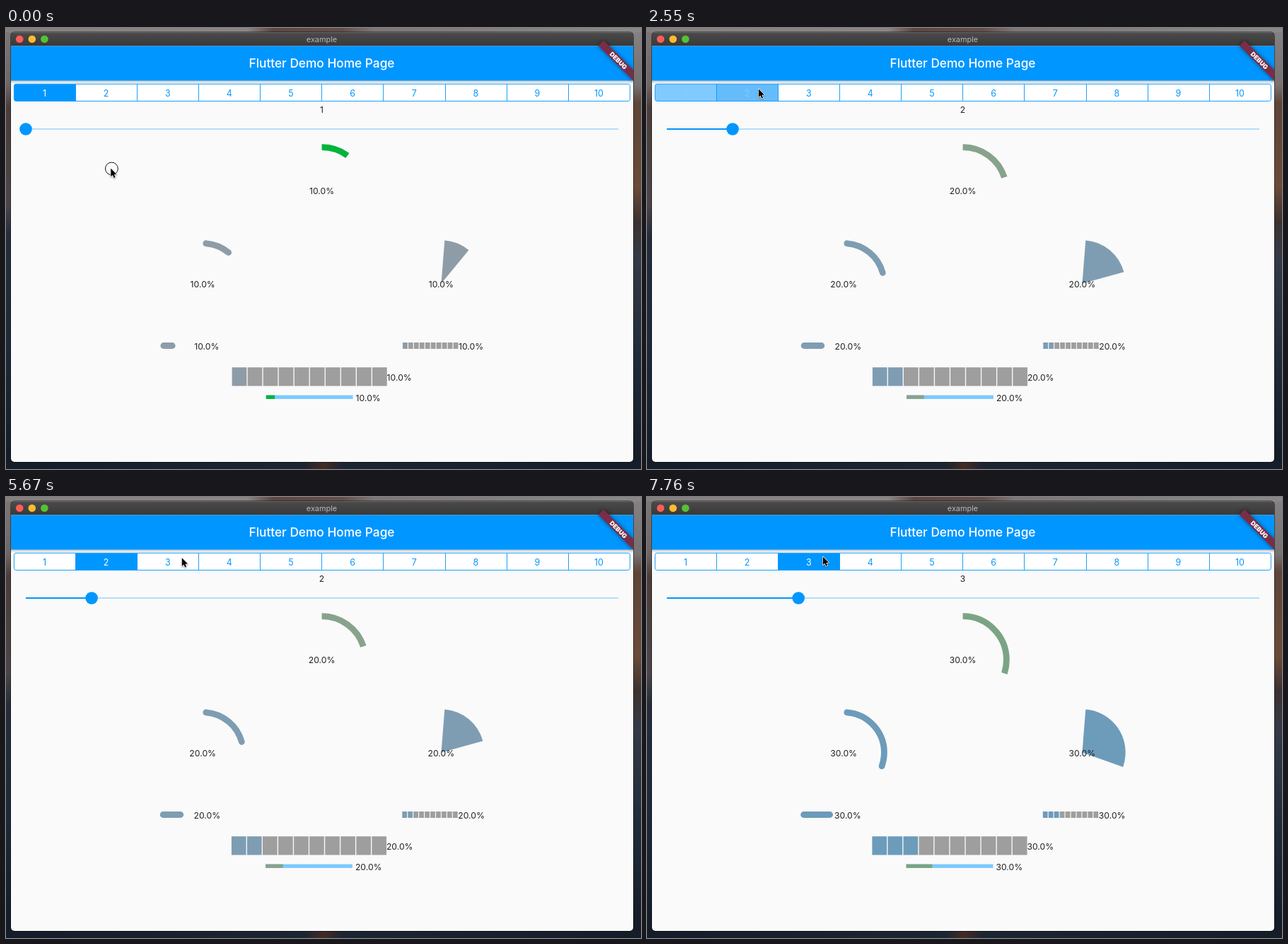
Recreate the animation shown at these times as an HTML page with a canvas. Size 898 by 624 pixels, loop 8 s.

```html
<!DOCTYPE html>
<html lang="en">
<head>
<meta charset="utf-8">
<title>Progress indicators</title>
<style>
html, body { margin: 0; width: 100%; height: 100%; overflow: hidden; background: #1b2432; }
canvas { display: block; }
</style>
</head>
<body>
<canvas id="stage" width="898" height="624"></canvas>
<script>
const c = document.getElementById('stage').getContext('2d');
const LOOP = 8000, BLUE = '#0096ff', INK = '#212121', GREY = '#9e9e9e';
const RAD = Math.PI / 180;

// Per value: accent of the ring, accent of the rest, left shift of the centred rows
const LOOKS = [
  { ring: '#00b43c', tone: '#8e9ca7', shift: 0 },
  { ring: '#88a38c', tone: '#7f9db2', shift: 0.7 },
  { ring: '#7ca484', tone: '#6d9bba', shift: 1.2 }
];

// Pointer steps: start time, x, y
const POINTER = [
  [0, 148.3, 198.7], [150, 168.5, 103.7], [300, 169, 90.5], [450, 160.5, 89.5],
  [600, 157.8, 86.3], [3140, 159, 85.7], [3290, 219.3, 84.5], [3590, 225.5, 83.8],
  [3740, 231.5, 85.3], [3880, 247.5, 87.3], [4030, 249.4, 87], [5670, 248.8, 86.3],
  [6570, 248.8, 85.4], [6870, 248.8, 84.5]
];
const ARROW = [[0, 0], [0, 11.6], [2.6, 9.2], [4.4, 13.3], [6.3, 12.5], [4.6, 8.5], [8.2, 8.3]];

function rect(x, y, w, h, fill) {
  c.fillStyle = fill;
  c.fillRect(x, y, w, h);
}

function disc(x, y, r, fill) {
  c.fillStyle = fill;
  c.beginPath();
  c.arc(x, y, r, 0, 2 * Math.PI);
  c.fill();
}

function line(x1, y1, x2, y2, color, width) {
  c.strokeStyle = color;
  c.lineWidth = width;
  c.beginPath();
  c.moveTo(x1, y1);
  c.lineTo(x2, y2);
  c.stroke();
}

function text(s, x, y, { size = 12.2, weight = 400, color = INK, align = 'center' } = {}) {
  c.font = `${weight} ${size}px Inter, Roboto, sans-serif`;
  c.textAlign = align;
  c.fillStyle = color;
  c.fillText(s, x, y);
}

function gradient(x1, y1, x2, y2, ...stops) {
  const g = c.createLinearGradient(x1, y1, x2, y2);
  stops.forEach(([at, color]) => g.addColorStop(at, color));
  return g;
}

// Angles in degrees, clockwise from the top
function arc(x, y, r, from, to) {
  c.arc(x, y, r, (from - 90) * RAD, (to - 90) * RAD);
}

function wallpaper() {
  rect(0, 0, 898, 7, gradient(0, 0, 898, 0, [0, '#85807f'], [0.38, '#8b8584'], [0.42, '#5d4742'],
    [0.53, '#64504b'], [0.58, '#7c7776'], [1, '#8a8889']));
  rect(0, 6, 8, 618, gradient(0, 0, 0, 624, [0, '#7c7776'], [0.13, '#6f6664'], [0.18, '#4b3d3c'],
    [0.4, '#4c4548'], [0.47, '#252d3b'], [0.75, '#1c2838'], [1, '#131b27']));
  rect(886, 6, 12, 618, gradient(0, 0, 0, 624, [0, '#858284'], [0.13, '#777170'], [0.17, '#5d4538'],
    [0.36, '#6a4a38'], [0.44, '#3c3130'], [0.52, '#343a46'], [0.75, '#1f2a39'], [1, '#131a25']));
  rect(0, 613, 898, 11, gradient(0, 0, 898, 0, [0, '#151d29'], [0.47, '#1c2532'], [0.5, '#432a24'],
    [0.53, '#1c2532'], [1, '#151d29']));
}

function banner() {
  c.save();
  c.translate(887, 25);
  c.rotate(45 * RAD);
  c.shadowColor = 'rgba(0,0,0,.5)';
  c.shadowBlur = 6;
  rect(-35, 24.4, 70, 10.5, '#7a2d47');
  c.shadowColor = 'transparent';
  text('DEBUG', 0, 32.9, { size: 8.8, weight: 900, color: '#fff' });
  c.restore();
}

function chrome() {
  rect(7, 25, 880, 589, '#fafafa');
  rect(7, 6, 880, 19.5, gradient(0, 6, 0, 25, [0, '#4b4b4b'], [1, '#393939']));
  rect(7, 6, 880, 1, '#686868');
  ['#fc5d57', '#fdbc2f', '#55c234'].forEach((color, i) => disc(19.2 + 17.6 * i, 15.8, 5.3, color));
  text('example', 446.5, 20, { size: 10.9, color: '#b8b8b8' });
  rect(7, 74, 880, 5, gradient(0, 74, 0, 79, [0, 'rgba(0,0,0,.22)'], [1, 'rgba(0,0,0,0)']));
  rect(7, 25.5, 880, 49, BLUE);
  text('Flutter Demo Home Page', 446.5, 56, { size: 17.3, weight: 500, color: '#fff' });
  banner();
}

function tabStyle(i, t) {
  const on = { fill: BLUE, color: '#fff' };
  const off = { fill: '#fff', color: BLUE };
  const pressed = { fill: '#cce7fc', color: BLUE };
  if (t >= 2550 && t < 2700 && i < 2)
    return { fill: i ? '#65bcfb' : '#80caff', color: i ? '#80caff' : '#8acfff' };
  const selected = t < 2550 ? 0 : t < 7760 ? 1 : 2;
  if (i === selected) return on;
  const held = t >= 1950 && t < 2550 ? 1 : t >= 7610 && t < 7760 ? 2 : -1;
  return i === held ? pressed : off;
}

function tabs(t) {
  const left = 11.4, step = 87.1, top = 79.3, height = 24.2;
  c.save();
  c.beginPath();
  c.roundRect(left, top, step * 10, height, 3);
  c.clip();
  for (let i = 0; i < 10; i++) rect(left + step * i, top, step + 0.5, height, tabStyle(i, t).fill);
  c.restore();
  for (let i = 0; i < 10; i++) {
    const x = left + step * i;
    if (i) line(Math.floor(x) + 0.5, top, Math.floor(x) + 0.5, top + height, BLUE, 0.9);
    text(i + 1, x + step / 2 - 0.4, 96.6, { size: 12.4, color: tabStyle(i, t).color });
  }
  c.strokeStyle = BLUE;
  c.lineWidth = 0.9;
  c.beginPath();
  c.roundRect(left, top, step * 10, height, 3);
  c.stroke();
}

function slider(n) {
  const x = 28 + 93.1 * (n - 1);
  text(n, 446.5, 120.3);
  line(x, 143, 866, 143, '#b2defd', 1.8);
  line(28, 143, x, 143, BLUE, 1.8);
  disc(x, 143, 8.8, BLUE);
}

function blocks(x, y, pitch, w, h, n, tone) {
  for (let i = 0; i < 10; i++) rect(x + pitch * i, y, w, h, i < n ? tone : GREY);
}

function indicators(n) {
  const { ring, tone, shift } = LOOKS[n - 1];
  const label = `${n * 10}.0%`;
  const start = 4.5, end = start + 35 * n;
  const left = { align: 'left' };

  c.lineWidth = 8.8;
  c.strokeStyle = ring;
  c.beginPath();
  arc(446.6, 230.5, 61.8, 0, 36 * n);
  c.stroke();
  text(label, 446.6, 235.3);

  c.strokeStyle = tone;
  c.lineCap = 'round';
  c.beginPath();
  arc(278.3, 361.7, 57.1, start, end);
  c.stroke();
  c.lineCap = 'butt';
  text(label, 278.2, 367.1);

  c.fillStyle = tone;
  c.beginPath();
  c.moveTo(615.5, 361.5);
  arc(615.5, 361.5, 61.2, start, end);
  c.fill();
  text(label, 615.3, 367.1);

  c.save();
  c.translate(-shift, 0);
  c.fillStyle = tone;
  c.beginPath();
  c.roundRect(218.4, 445.1, 8.9 + 12.3 * n, 8.8, 4.4);
  c.fill();
  text(label, 266.2, 454.7, left);

  blocks(561, 445, 7.96, 6.8, 9, n, tone);
  text(label, 640, 454.7, left);

  blocks(319.6, 480.2, 22.05, 20.7, 26.3, n, tone);
  text(label, 538.6, 498.6, left);

  rect(367.8, 519.6, 122.8, 5.3, '#7ac9ff');
  rect(367.8, 519.6, 12.28 * n, 5.3, ring);
  text(label, 494.6, 527.6, left);
  c.restore();
}

function pointer(t) {
  const [, x, y] = POINTER.findLast(step => step[0] <= t);
  const ripple = t < 150 ? [149.4, 199] : t >= 1800 && t < 2550 ? [159.2, 85.9]
    : t >= 7460 && t < 7610 ? [250.4, 84.3] : null;
  if (ripple) {
    c.strokeStyle = '#111';
    c.lineWidth = 1;
    c.beginPath();
    c.arc(...ripple, 8.9, 0, 2 * Math.PI);
    c.stroke();
  }
  c.save();
  c.translate(x, y);
  c.beginPath();
  ARROW.forEach(p => c.lineTo(...p));
  c.closePath();
  c.lineJoin = 'round';
  c.strokeStyle = '#fff';
  c.lineWidth = 1.5;
  c.shadowColor = 'rgba(0,0,0,.4)';
  c.shadowBlur = 2;
  c.shadowOffsetY = 1;
  c.stroke();
  c.shadowColor = 'transparent';
  c.fillStyle = '#000';
  c.fill();
  c.restore();
}

function draw(now) {
  const t = now % LOOP;
  const n = t < 2550 ? 1 : t < 7610 ? 2 : 3;
  wallpaper();
  c.save();
  c.beginPath();
  c.roundRect(7, 6, 880, 608, 5);
  c.strokeStyle = 'rgba(0,0,0,.6)';
  c.lineWidth = 1.5;
  c.stroke();
  c.clip();
  chrome();
  tabs(t);
  slider(n);
  indicators(n);
  c.restore();
  pointer(t);
}

const begin = performance.now();
function tick() {
  draw(performance.now() - begin);
  requestAnimationFrame(tick);
}
tick();
</script>
</body>
</html>
```
